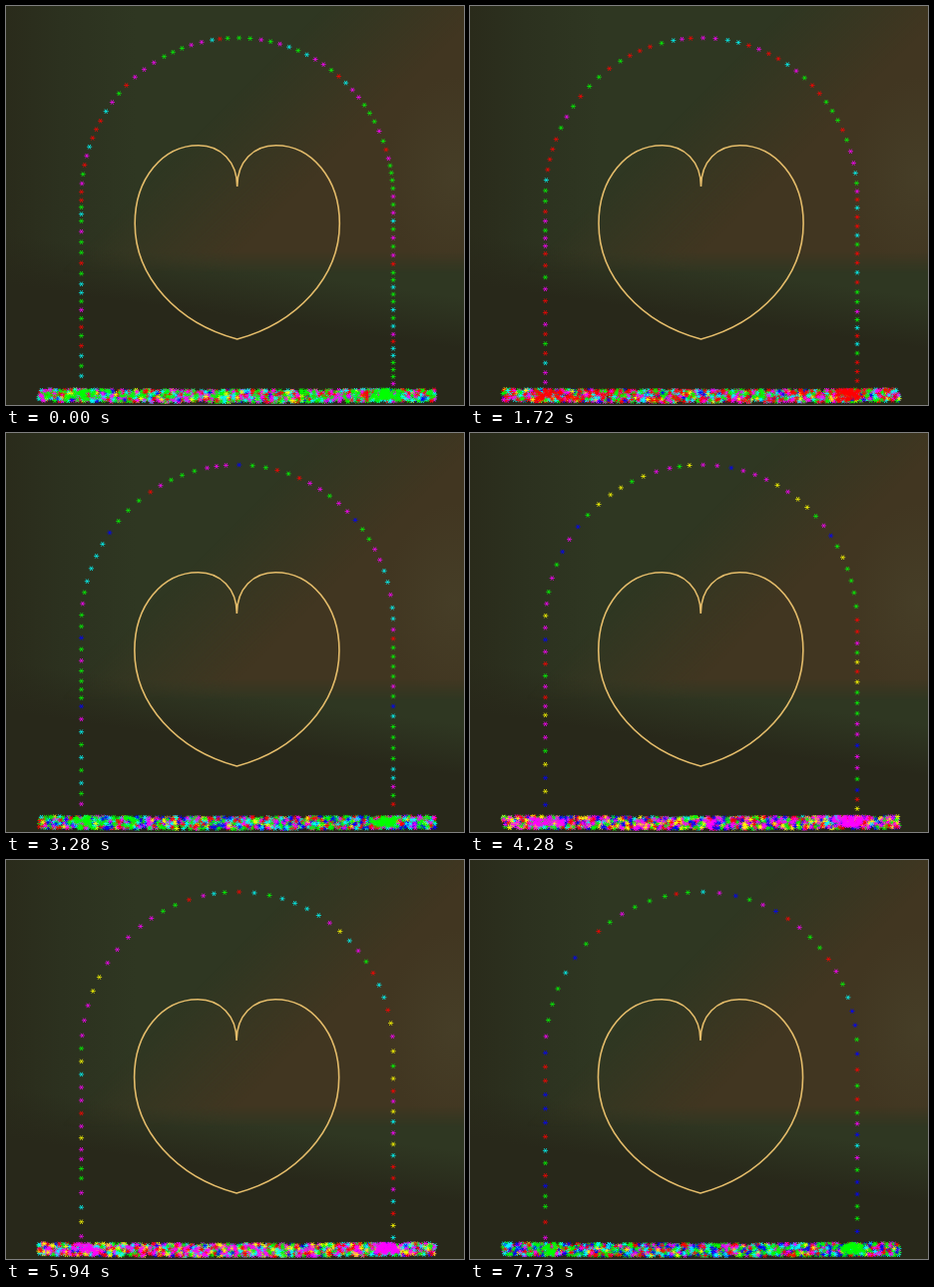
Animation, 459 px wide and 400 px high, one loop 8000 ms. Source, as an HTML page with a canvas:

```html
<!DOCTYPE html>
<html lang="en">
<head>
<meta charset="utf-8">
<title>Heart under a star arch</title>
<style>
html, body { margin: 0; width: 100%; height: 100%; overflow: hidden; background: #28281a; }
#stage {
  position: relative; width: 459px; height: 400px; overflow: hidden;
  background:
    linear-gradient(188deg, rgba(40,40,26,0) 63%, #28281a 74%),
    linear-gradient(to right, #2a2b1b 0, #2c311f 55px, #2f3722 130px);
}
#glow {
  position: absolute; left: 0; top: 0; width: 459px; height: 268px;
  background:
    radial-gradient(ellipse 70px 100px at 450px 170px, rgba(74,68,44,.55), rgba(74,68,44,0)),
    linear-gradient(135deg, rgba(65,54,33,0) 44%, #413621 66%);
  -webkit-mask-image: linear-gradient(#000 92%, transparent);
  mask-image: linear-gradient(#000 92%, transparent);
}
canvas, svg { position: absolute; left: 0; top: 0; }
</style>
</head>
<body>
<div id="stage">
  <div id="glow"></div>
  <svg width="459" height="400" viewBox="0 0 459 400">
    <path id="heart" fill="none" stroke="#e4bc6a" stroke-width="1.6" stroke-linejoin="round"
      d="M231.7 181C231.7 156 215 139.7 193 139.7C157 139.7 129.2 173 129.2 218C129.2 272 172 318 231.7 334C291 318 334.3 272 334.3 218C334.3 173 306 139.7 270.5 139.7C248 139.7 231.7 156 231.7 181"/>
  </svg>
  <canvas id="sky" width="459" height="400"></canvas>
</div>
<script>
const LOOP = 8000;
const STARTS = [0, 60, 460, 990, 1720, 2280, 2780, 3280, 3780, 4280, 4940, 5440, 5940, 6540, 6970, 7730];
const COLORS = { r: '#f00', g: '#0f0', b: '#00f', c: '#0ff', m: '#f0f', y: '#ff0' };
const ALL = 'rgbcmy';

// Colours of each step, the commonest first
const MOODS = ('gmcr mcgr crmgb gmrc rgmc cmgr rmgc gmcrb ' +
               'bmgc mgbyr crmg gmyc mcryg cgrb rmgb gbcrm').split(' ');

// Arch geometry: half an ellipse on two straight legs
const CX = 231.8, CY = 192, RX = 156.3, RY = 160, GROUND = 380;

// Key points [star number, distance from the top], at the last step
const LEFT = [[0, 0], [3, 35], [5, 67], [8, 111], [12, 182], [16, 248], [23, 346],
  [25, 371], [28, 402], [34, 496], [40, 573], [45, 648]];
const RIGHT = [[0, 0], [2, 33], [17, 249], [19, 281], [21, 308], [24, 341],
  [30, 414], [35, 479], [39, 522], [43, 571], [51, 655]];

const sky = document.getElementById('sky').getContext('2d');
const heart = document.getElementById('heart');

function seeded(seed) {
  let a = seed * 7919 + 1013;
  return () => {
    a = (a + 0x6d2b79f5) | 0;
    let t = Math.imul(a ^ (a >>> 15), a | 1);
    t ^= t + Math.imul(t ^ (t >>> 7), t | 61);
    return ((t ^ (t >>> 14)) >>> 0) / 4294967296;
  };
}

function along(keys, x) {
  const i = keys.findIndex(k => k[0] >= x) || 1;
  const [x0, y0] = keys[i - 1], [x1, y1] = keys[i];
  return y0 + (y1 - y0) * (x - x0) / (x1 - x0);
}

// Samples of [arc length, angle] along a quarter of the ellipse
const arc = [[0, 0]];
for (let i = 1; i <= 300; i++) {
  const a = i / 300 * Math.PI / 2;
  const step = Math.hypot(RX * Math.cos(a), RY * Math.sin(a)) * Math.PI / 600;
  arc.push([arc[i - 1][0] + step, a]);
}
const QUARTER = arc[300][0];

function onArch(s, side) {
  if (s >= QUARTER) return [CX + side * RX, CY + s - QUARTER];
  const a = along(arc, s);
  return [CX + side * RX * Math.sin(a), CY - RY * Math.cos(a)];
}

function star(x, y, color) {
  sky.strokeStyle = COLORS[color];
  sky.beginPath();
  for (let i = 0; i < 3; i++) {
    const a = i * Math.PI / 3, dx = 2.6 * Math.cos(a), dy = 2.6 * Math.sin(a);
    sky.moveTo(x - dx, y - dy);
    sky.lineTo(x + dx, y + dy);
  }
  sky.stroke();
}

function drawSide(keys, side, scale, pick) {
  const count = keys[keys.length - 1][0];
  for (let i = 1; i <= count; i++) {
    const [x, y] = onArch(1.8 + along(keys, i) * scale, side);
    if (y > GROUND) break;
    star(x, y, pick());
  }
}

function drawGround(rnd, pick, foot) {
  for (let i = 0; i < 1700; i++) {
    const x = 33 + rnd() * 397;
    const sag = Math.sin((x - 33) / 397 * Math.PI);
    const color = rnd() < 0.35 ? ALL[Math.floor(rnd() * 6)] : pick();
    star(x, 384.4 + sag + rnd() * 11.4, color);
  }
  const pile = (x, w, n) => {
    for (let i = 0; i < n; i++) {
      star(x + (rnd() + rnd() - 1) * w, 385 + rnd() * 9, foot);
    }
  };
  pile(77, 20, 25);
  pile(380, 17, 50);
}

function draw(n) {
  const rnd = seeded(n + 1);
  const mood = MOODS[n];
  const pick = () => mood[Math.floor(mood.length * rnd() ** 1.5)];
  const scale = (1 + 0.0295 * n + 0.0002 * n * n) / 1.4875;

  sky.clearRect(0, 0, 459, 400);
  sky.lineWidth = 0.85;
  sky.globalAlpha = 0.85;
  star(233.6, 32, pick());
  drawSide(LEFT, -1, scale, pick);
  drawSide(RIGHT, 1, scale, pick);
  sky.globalAlpha = 1;
  drawGround(rnd, pick, mood[0]);
  heart.setAttribute('transform', `translate(${-0.05 * n} 0)`);
}

let shown = -1;
const begin = performance.now();
function tick() {
  const t = (performance.now() - begin) % LOOP;
  let n = STARTS.length - 1;
  while (STARTS[n] > t) n--;
  if (n !== shown) draw(shown = n);
  requestAnimationFrame(tick);
}
tick();
</script>
</body>
</html>
```
